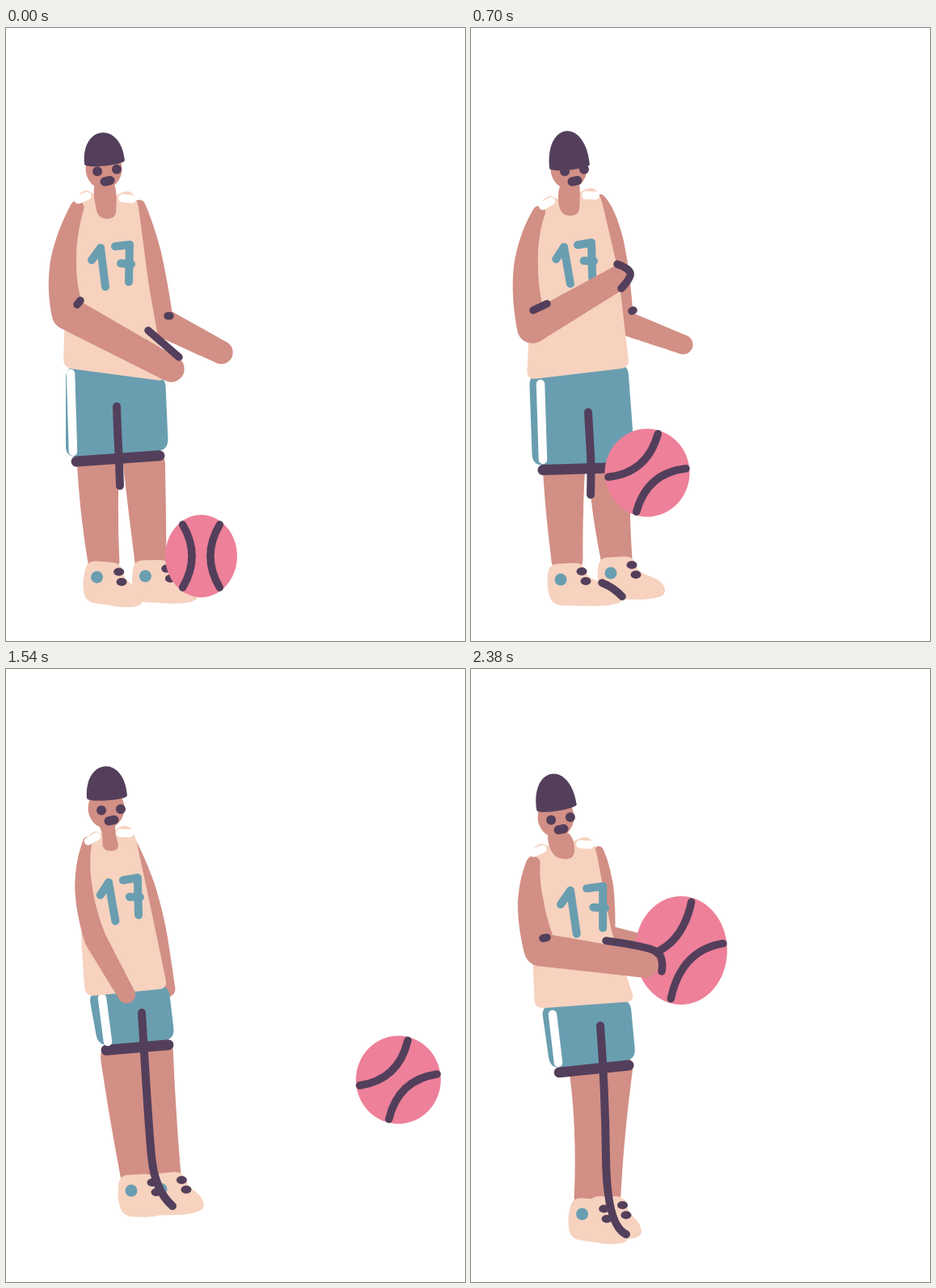
Recreate the animation shown at these times as an HTML page with a canvas. Size 568 px wide and 758 px high, loop 2.52 s.

```html
<!DOCTYPE html>
<html lang="en">
<head>
<meta charset="utf-8">
<title>Basketball practice</title>
<style>
html, body { margin: 0; width: 100%; height: 100%; overflow: hidden; background: #fff; }
canvas { display: block; width: 568px; height: 758px; }
</style>
</head>
<body>
<canvas id="stage" width="568" height="758"></canvas>
<script>
const ctx = document.getElementById('stage').getContext('2d');
const STEP = 140;
const DARK = '#533f5b', SKIN = '#d28f85', CREAM = '#f6d2bf', TEAL = '#699eb0', PINK = '#ee8099', WHITE = '#fff';
const ARM = [8, 15, 19, 15], LEG = [26, 23, 19.5];

const points = s => s.split(' ').map(p => p.split(',').map(Number));
const pose = parts => Object.fromEntries(Object.entries(parts).map(([k, s]) => [k, points(s)]));

// Joints of the figure. head: x, brow y, hair height, tilt. num: x, y, scale, tilt.
// torso: right side, right hem, left hem, left side. feet: x, y, tilt, length.
// arms: shoulder, upper arm, elbow, hand. girth: near arm, far arm.
const low = pose({
  head: '122,166,37,-.1', look: '125,176', straps: '95,210 150,211', collar: '125,236',
  torso: '177,320 198,437 71,420 72,375', num: '117,272,1,0',
  near: '88,222 71,290 77,353 207,423', far: '165,220 178,280 189,362 268,402', girth: '1.08,.95',
  cuff: '176,374 214,407', elbow: '88,342 92,337', farElbow: '200,356 203,356',
  shorts: '74,418 74,531 201,522 197,430', stripe: '80,427 83,524',
  legL: '114,540 116,600 121,660', legR: '171,540 175,600 179,660',
  line: '137,468 138,500 140,535 141,566', feet: '121,661,.13,55 179,659,.03,61'
});
const high = pose({
  head: '122,171,44,-.1', look: '128,176', straps: '94,217 148,207', collar: '123,232',
  torso: '182,300 196,420 69,435 71,390', num: '115,271,.95,-.05',
  near: '84,228 68,295 76,371 186,307', far: '160,212 177,265 186,363 264,392', girth: '1,.8',
  cuff: '181,292 195,297 199,308 186,322', elbow: '77,349 94,341', farElbow: '199,350 201,349',
  shorts: '72,428 76,541 203,537 194,415', stripe: '86,440 89,534',
  legL: '115,548 116,600 119,658', legR: '171,545 174,600 180,655',
  line: '145,475 147,510 149,545 148,577', toe: '162,686 177,692 187,703',
  feet: '117,663,0,72 179,655,0,62'
});
const aim = pose({
  head: '124,162,41,0', look: '125,175', straps: '92,214 153,209', collar: '126,224',
  torso: '186,300 197,392 84,419 77,300', num: '119,266,.95,0',
  near: '88,218 85,270 124,320 205,218', far: '160,215 171,245 197,346 270,268', girth: '1,1.1',
  cuff: '169,239 175,230', elbow: '125,303 131,298', farElbow: '187,300 193,290',
  shorts: '94,415 134,498 222,470 196,388', stripe: '115,419 153,488',
  legL: '172,500 152,560 124,618', legR: '194,490 194,560 182,635',
  line: '174,426 197,470 194,545 164,595', feet: '124,620,.38,40 181,636,.03,43'
});
const stand = pose({
  head: '125,158,38,-.07', look: '130,174', straps: '107,210 147,203', collar: '130,225',
  torso: '178,290 200,395 98,405 93,335', num: '127,264,1,-.05',
  near: '101,213 96,270 111,335 150,404', far: '155,212 175,270 188,335 200,397', girth: '.72,.65',
  shorts: '102,400 114,466 209,458 201,390', stripe: '119,407 126,461',
  legL: '143,480 151,550 161,625', legR: '181,475 188,550 197,625',
  line: '168,425 176,560 184,645 206,664', feet: '161,626,0,41 197,624,-.05,47'
});
const crouch = pose({
  head: '292,234,38,.12', look: '291,245', straps: '258,258 322,272', collar: '287,293',
  torso: '325,360 292,441 181,490 181,425', num: '263,318,1.2,.18',
  near: '249,268 214,325 208,385 307,455', far: '334,285 346,330 320,425 370,492', girth: '.95,.95',
  cuff: '303,441 315,447 320,455 321,463', knee: '265,559 268,559',
  shorts: '188,483 224,552 332,488 312,452', stripe: '216,484 232,507 255,526',
  legL: '300,522 275,581 207,628', legR: '311,510 324,555 310,630',
  line: '286,474 325,520 323,570 289,604', feet: '197,621,.35,40 310,630,-.04,53'
});
const hold = pose({
  head: '106,171,42,-.15', look: '111,185', straps: '83,225 141,217', collar: '117,235',
  torso: '174,325 203,411 79,420 77,375', num: '123,274,1.12,-.02',
  near: '77,240 74,290 86,347 218,366', far: '158,225 165,270 164,330 203,337', girth: '1.08,.75',
  cuff: '167,336 218,343 239,355 236,374', elbow: '89,333 94,332',
  shorts: '87,416 98,494 204,483 197,408', stripe: '101,427 108,487',
  legL: '148,500 151,575 147,655', legR: '174,495 168,575 166,650',
  line: '160,441 166,520 168,688 192,699', feet: '146,656,.13,55 168,653,.05,46'
});
const armsUp = pose({ near: '92,212 95,255 135,275 235,150', far: '160,212 178,225 205,220 262,158' });
const armsOut = pose({ near: '100,215 98,260 122,300 240,252', far: '158,212 175,235 200,270 275,242' });

// Blends the parts that both poses share.
function mix(a, b, t) {
  const out = {};
  for (const k in a) {
    if (!b[k]) continue;
    out[k] = a[k].slice(0, b[k].length).map((p, i) => p.map((v, j) => v + (b[k][i][j] - v) * t));
  }
  return out;
}

const ball = (x, y, turn, rx = 52.5, ry = 54.5) => ({ x, y, turn, rx, ry });

const dribble = [0, 1, 2, 3, 4, 5].map(i => i % 2
  ? [high, ball(218, 550, 50)]
  : [low, ball(241.5, 653, 0, 44.5, 51)]);

const cels = [
  ...dribble,
  [mix(high, aim, .4), ball(239, 400, 30)],
  [aim, ball(255, 229, 10, 50, 57)],
  [{ ...mix(aim, stand, .75), ...armsUp }, ball(330, 99, 40)],
  [{ ...mix(aim, stand, .92), ...armsOut }, ball(452, 114, 70)],
  [{ ...stand, ...mix(armsOut, stand, .6) }, ball(472, 217, 10)],
  [stand, ball(485.5, 508, 48)],
  [mix(stand, crouch, .3), ball(479, 621, 60)],
  [crouch, ball(409.5, 605, 72)],
  [mix(crouch, stand, -.03), ball(404, 629, 40)],
  [crouch, ball(365, 479, 8, 50, 51)],
  [mix(crouch, hold, .58), ball(275, 410, 28)],
  [hold, ball(260, 348, 48, 57, 67)]
];

const between = (a, b, t) => [a[0] + (b[0] - a[0]) * t, a[1] + (b[1] - a[1]) * t];
const shift = (p, x, y) => [p[0] + x, p[1] + y];

function place(x, y, tilt, scale = 1) {
  const c = Math.cos(tilt) * scale, s = Math.sin(tilt) * scale;
  return ([u, v]) => [x + u * c - v * s, y + u * s + v * c];
}

// Filled polygon with softened corners.
function soft(pts, color, r) {
  const n = pts.length;
  ctx.beginPath();
  pts.forEach((p, i) => {
    const cut = q => between(p, q, Math.min(.5, r / Math.hypot(q[0] - p[0], q[1] - p[1])));
    ctx.lineTo(...cut(pts[(i + n - 1) % n]));
    ctx.quadraticCurveTo(...p, ...cut(pts[(i + 1) % n]));
  });
  ctx.fillStyle = color;
  ctx.fill();
}

// Tapered limb: a curve through the first three joints, then a straight part.
function limb(joints, radii, girth = 1) {
  const [a, m, b, end] = joints;
  const c = [2 * m[0] - (a[0] + b[0]) / 2, 2 * m[1] - (a[1] + b[1]) / 2];
  const parts = joints.length - 1;
  ctx.beginPath();
  for (let t = 0; t <= parts; t += .02) {
    const i = Math.min(parts - 1, Math.floor(t)), u = t / 2;
    const [x, y] = t <= 2 ? between(between(a, c, u), between(c, b, u), u) : between(b, end, t - 2);
    const r = (radii[i] + (radii[i + 1] - radii[i]) * (t - i)) * girth;
    ctx.moveTo(x + r, y);
    ctx.arc(x, y, r, 0, Math.PI * 2);
  }
  ctx.fillStyle = SKIN;
  ctx.fill();
}

function stroke(pts, color = DARK, width = 9.5) {
  if (!pts) return;
  const last = pts.length - 1;
  ctx.beginPath();
  ctx.moveTo(...pts[0]);
  for (let i = 1; i < last; i++) ctx.quadraticCurveTo(...pts[i], ...(i < last - 1 ? between(pts[i], pts[i + 1], .5) : pts[last]));
  if (last === 1) ctx.lineTo(...pts[1]);
  ctx.strokeStyle = color;
  ctx.lineWidth = width;
  ctx.stroke();
}

function spot([x, y], color, rx, ry = rx) {
  ctx.beginPath();
  ctx.ellipse(x, y, rx, ry, 0, 0, Math.PI * 2);
  ctx.fillStyle = color;
  ctx.fill();
}

function drawBall(b) {
  spot([b.x, b.y], PINK, b.rx, b.ry);
  const rim = deg => {
    const a = deg * Math.PI / 180;
    return [b.x + Math.cos(a) * b.rx * .92, b.y + Math.sin(a) * b.ry * .92];
  };
  for (const axis of [b.turn, b.turn + 180]) stroke([rim(axis - 56), [b.x, b.y], rim(axis + 56)]);
}

function drawShoe([x, y, tilt, len]) {
  const at = place(x, y, tilt);
  const outline = [[-21, 0], [22, -2], [27, 17], [len - 4, 29], [len + 1, 46], [len - 20, 52], [-16, 51], [-23, 30]];
  soft(outline.map(at), CREAM, 12);
  spot(at([-6, 19]), TEAL, 7.5);
  for (const p of [[20, 9], [25, 21]]) spot(at(p), DARK, 6.5, 5);
}

function drawShorts(p) {
  const [, bl, br] = p.shorts;
  soft(p.shorts, TEAL, 14);
  const len = Math.hypot(br[0] - bl[0], br[1] - bl[1]);
  const drop = q => shift(q, 6 * (bl[1] - br[1]) / len, 6 * (br[0] - bl[0]) / len);
  stroke([drop(between(bl, br, .1)), drop(between(bl, br, .91))], DARK, 13);
  stroke(p.stripe, WHITE, 10.5);
}

function drawJersey(p) {
  const [l, r] = p.straps, [c] = p.collar;
  soft([
    shift(l, -11, 3), shift(l, 2, -11), shift(l, 14, -5), shift(c, 0, -14),
    shift(r, -14, -5), shift(r, 4, -11), shift(r, 13, 3), ...p.torso
  ], CREAM, 11);
  const at = place(p.num[0][0], p.num[0][1], p.num[0][3], p.num[0][2]);
  const chain = pts => pts.slice(1).forEach((q, i) => stroke([at(pts[i]), at(q)], TEAL, 10));
  chain([[-11, 15], [0, 0], [6, 48]]);
  chain([[18, -2], [36, -4], [35, 42]]);
  chain([[25, 19], [38, 20]]);
  const [x, , ] = p.head[0], chin = p.look[0][1] + 14;
  soft([[x - 12, chin], shift(l, 13, -5), shift(c, -11, 0), shift(c, 11, 0), shift(r, -13, -5), [x + 12, chin]], SKIN, 11);
}

function drawHead(p) {
  const [x, y, h, tilt] = p.head[0], [look] = p.look;
  spot([x - 1, look[1] - 2], SKIN, 22.5, 25);
  ctx.save();
  ctx.translate(x, y);
  ctx.rotate(tilt);
  ctx.beginPath();
  ctx.moveTo(-25, 0);
  ctx.bezierCurveTo(-25, -h * 1.33, 25, -h * 1.33, 25, 0);
  ctx.bezierCurveTo(25, 6, -25, 6, -25, 0);
  ctx.fillStyle = DARK;
  ctx.fill();
  ctx.restore();
  const at = place(look[0], look[1], tilt);
  for (const side of [-12, 12]) spot(at([side, 0]), DARK, 6);
  stroke([shift(look, -3, 14), shift(look, 4, 12.5)], DARK, 11);
}

function drawStraps(p) {
  const tilt = p.num[0][3];
  [-.4 + 2 * tilt, .1 + 1.5 * tilt].forEach((a, i) => {
    const at = place(...p.straps[i], a);
    stroke([at([-6, 0]), at([6, 0])], WHITE, 10);
  });
}

function draw([p, b]) {
  ctx.fillStyle = WHITE;
  ctx.fillRect(0, 0, 568, 758);
  const [nearGirth, farGirth] = (p.girth || [[1, 1]])[0];
  limb(p.far, ARM, farGirth);
  limb(p.legL, LEG);
  limb(p.legR, LEG);
  drawShorts(p);
  drawJersey(p);
  drawHead(p);
  drawShoe(p.feet[1]);
  drawShoe(p.feet[0]);
  stroke(p.line, DARK, 10);
  stroke(p.toe);
  drawBall(b);
  limb(p.near, ARM, nearGirth);
  for (const k of ['cuff', 'elbow', 'farElbow', 'knee']) stroke(p[k]);
  drawStraps(p);
}

ctx.lineCap = ctx.lineJoin = 'round';
let shown = -1;
function tick() {
  const i = Math.floor(performance.now() / STEP) % cels.length;
  if (i !== shown) draw(cels[shown = i]);
  requestAnimationFrame(tick);
}
tick();
</script>
</body>
</html>
```
